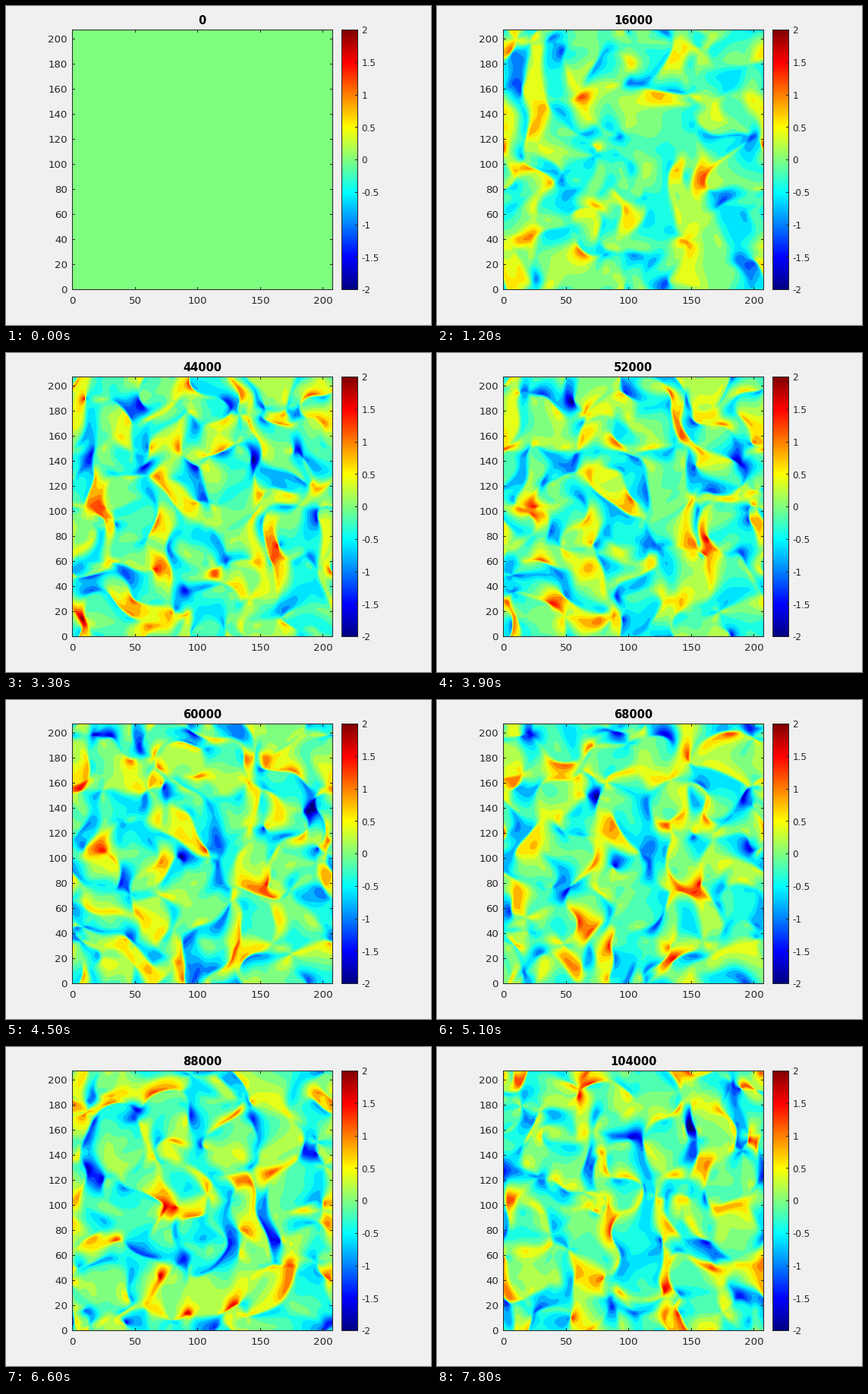
Animation of 560 by 420 pixels, one loop 8 s. Source, as a matplotlib script:

```python
import numpy as np
import matplotlib.pyplot as plt
from matplotlib.animation import FuncAnimation

N = 208                          # periodic grid size
LEFT, RIGHT, TOP, BOTTOM = 87.5, 430.5, 31.5, 373.5
SCALE = (BOTTOM - TOP) / (N - 1)
STEPS, STEP_TITLE = 27, 4000
FRAMES, INTERVAL, HOLD = 80, 100, 3
INK = "#262626"

rng = np.random.default_rng(5)
gx, gy = np.meshgrid(np.arange(N), np.arange(N))
freq = np.fft.fftfreq(N, 1 / N)
kx, ky = np.meshgrid(freq, freq)
k2 = np.maximum(kx ** 2 + ky ** 2, 1)

# linear interpolation from grid to screen pixels
screen = np.linspace(0, N - 1, 343)
upsample = np.maximum(0, 1 - np.abs(screen[:, None] - np.arange(N)))


def make_waves(count, low, high):
    radius, angle = rng.uniform(low, high, count), rng.uniform(0, 2 * np.pi, count)
    return list(zip(np.round(radius * np.cos(angle)), np.round(radius * np.sin(angle)),
                    rng.uniform(0, 2 * np.pi, count), rng.normal(0, 0.3, count)))


def noise(waves, x, y, step):
    total = sum(np.cos(2 * np.pi / N * (m * x + n * y) + phase + speed * step)
                for m, n, phase, speed in waves)
    return total * np.sqrt(2 / len(waves))


order_a, order_b = make_waves(30, 2, 7), make_waves(30, 2, 7)
warp_x, warp_y = make_waves(12, 1, 5), make_waves(12, 1, 5)


def vorticity(step):
    """Stokes flow of an active nematic whose uniform order breaks up into defects."""
    if step == 0:
        return np.zeros((N, N))
    disorder = 1 - np.exp(-(step / 4) ** 2)
    x = gx + 7 * noise(warp_x, gx, gy, step)
    y = gy + 7 * noise(warp_y, gx, gy, step)
    qxx = 1.5 * (1 - disorder) + disorder * noise(order_a, x, y, step)
    qxy = disorder * noise(order_b, x, y, step)
    size = np.sqrt(qxx ** 2 + qxy ** 2 + 0.12)
    stress = ((kx ** 2 - ky ** 2) * np.fft.fft2(qxy / size)
              - 2 * kx * ky * np.fft.fft2(qxx / size))
    flow = np.fft.ifft2(stress * k2 ** -0.8).real
    return 0.45 * (1 - np.exp(-(step / 3) ** 2)) * flow / flow.std()


def jet(value):
    t = np.clip((np.asarray(value) + 2) / 4, 0, 1)[..., None]
    return np.clip(1.5 - np.abs(4 * t - np.array([3, 2, 1])), 0, 1)


def contour_image(step):
    """Filled contour bands with smoothed edges; each band takes its lower level."""
    spacing = 0.2 * min(1, max(step, 0.5) / 4)
    bands = (upsample @ vorticity(step) @ upsample.T + 1e-6) / spacing
    slope = np.maximum(np.hypot(*np.gradient(bands)), 1e-9)
    edge = np.round(bands)
    return jet(spacing * (edge - 1 + np.clip((bands - edge) / slope + 0.5, 0, 1)))


images = [contour_image(step) for step in range(STEPS)]

fig = plt.figure(figsize=(5.6, 4.2), dpi=100, facecolor="#f0f0f0")
ax = fig.add_axes([0, 0, 1, 1])
ax.axis("off")


def line(*ends):
    """One-pixel line through whole pixels from x0, y0 to x1, y1."""
    x0, y0, x1, y1 = np.floor(ends) + 0.5
    ax.plot([x0, x1], [y0, y1], color=INK, lw=0.72, snap=False,
            solid_capstyle="projecting", zorder=3)


def label(x, y, text, size, align, **style):
    return ax.text(x, y, text, fontsize=size * 0.72, ha=align, va="baseline",
                   family="DejaVu Sans", **{"color": INK, **style})


def frame(x0, x1):
    for x in (x0, x1):
        line(x, TOP, x, BOTTOM)
    for y in (TOP, BOTTOM):
        line(x0, y, x1, y)


field = ax.imshow(images[0], extent=(88, 431, 374, 31), interpolation="nearest", aspect="auto")
bar = jet(np.linspace(2, -2, 256))[:, None, :]
ax.imshow(bar, extent=(442, 464, 374, 31), interpolation="nearest", aspect="auto")
ax.set(xlim=(0, 560), ylim=(420, 0))

frame(LEFT, RIGHT)
frame(442.5, 463.5)
for value in range(0, 201, 50):
    x = LEFT + value * SCALE
    line(x, BOTTOM, x, BOTTOM - 3)
    line(x, TOP, x, TOP + 3)
    label(x, 392, str(value), 13.33, "center")
for value in range(0, 201, 20):
    y = BOTTOM - value * SCALE
    line(LEFT, y, LEFT + 3, y)
    line(RIGHT, y, RIGHT - 3, y)
    label(81, y + 4.8, str(value), 13.33, "right")
for value in np.arange(-2, 2.1, 0.5):
    y = (TOP + BOTTOM) / 2 - value * (BOTTOM - TOP) / 4
    line(463.5, y, 460.5, y)
    label(468.5, y + 4.8, f"{value:g}", 12, "left")
title = label(258.8, 24, "0", 14.67, "center", weight="bold", color="black")


def update(index):
    step = index // HOLD
    field.set_data(images[step])
    title.set_text(str(step * STEP_TITLE))
    return field, title


anim = FuncAnimation(fig, update, frames=FRAMES, interval=INTERVAL,
                     repeat=True, repeat_delay=0, blit=False)
plt.show()
```
